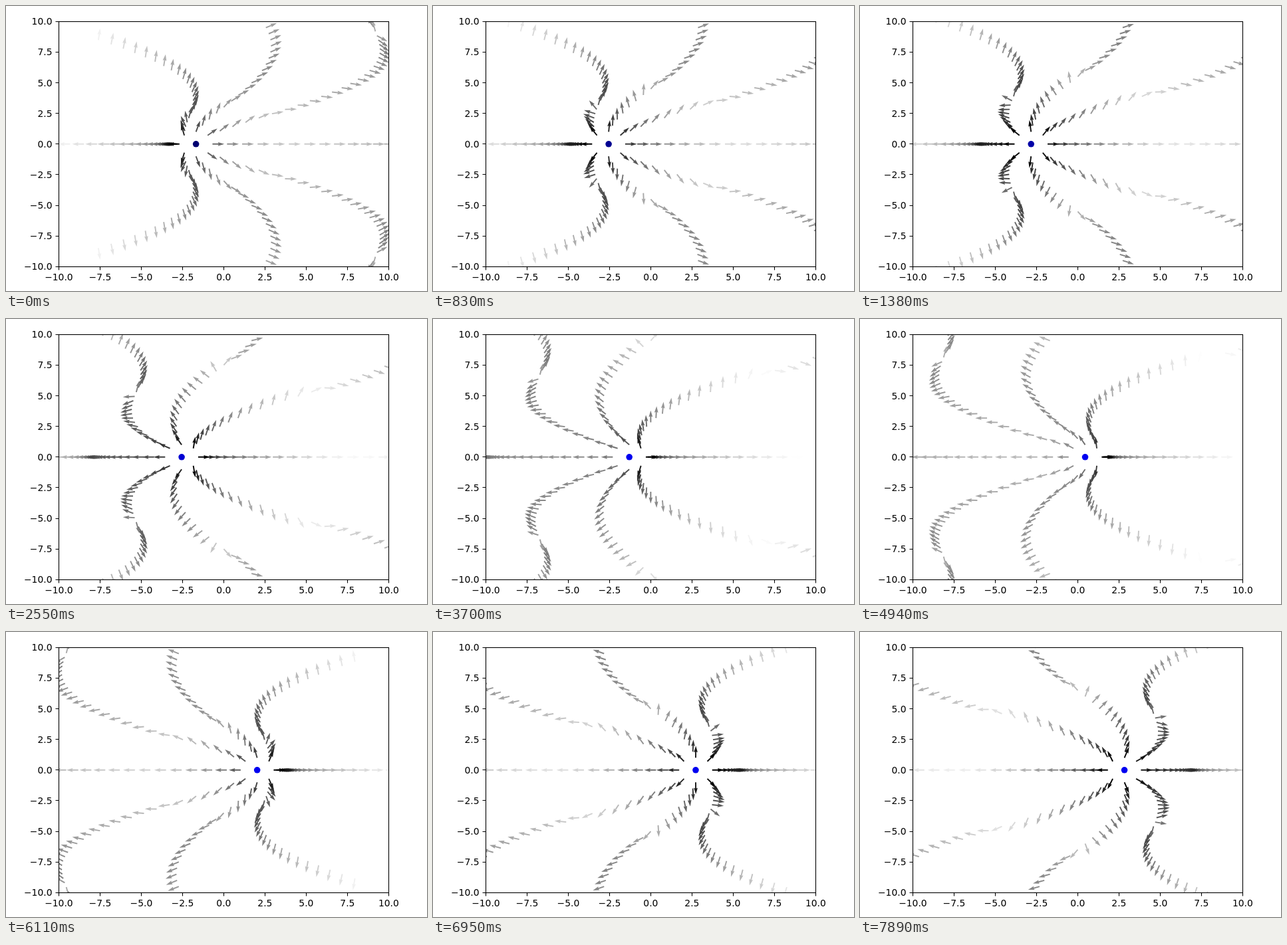
An HTML page with a canvas that plays this animation: 633 by 429 pixels, repeating every 8000 ms.

```html
<!DOCTYPE html>
<html>
<head>
<meta charset="utf-8">
<style>
html, body { margin: 0; width: 100%; height: 100%; overflow: hidden; background: #fff; }
canvas { display: block; width: 633px; height: 429px; }
</style>
</head>
<body>
<canvas id="stage" width="633" height="429"></canvas>
<script>
const ctx = document.getElementById('stage').getContext('2d');
const LOOP = 8000;
const CHANGES = [210, 520, 830, 1060, 1380, 1680, 2000, 2230, 2550, 2860, 3170, 3470, 3700, 4020,
  4330, 4640, 4940, 5250, 5570, 5800, 6110, 6410, 6720, 6950, 7270, 7590, 7890];

const box = { left: 79.4, right: 575.4, top: 23.3, bottom: 392.3 };
const px = x => box.left + (x + 10) / 20 * (box.right - box.left);
const py = y => box.bottom - (y + 10) / 20 * (box.bottom - box.top);

// Oscillating charge, speed of light = 1
const OMEGA = Math.PI / 10, PEAK_SPEED = 0.9, AMPLITUDE = PEAK_SPEED / OMEGA;
const DT = 0.5, RAYS = 8, POINTS = 30;
const FAINTEST = 0.0007;
const ARROW = 17.8, WIDTH = 1.92;

const chargeX = t => AMPLITUDE * Math.sin(OMEGA * t);

// Field of a signal emitted at time t along (nx, ny), after travelling distance r
function field(t, nx, ny, r) {
  const beta = PEAK_SPEED * Math.cos(OMEGA * t);
  const accel = -PEAK_SPEED * OMEGA * Math.sin(OMEGA * t);
  const kappa = 1 - nx * beta, k3 = kappa ** 3;
  const near = (1 - beta * beta) / (k3 * r * r);
  const far = 1 / (k3 * r);
  const along = nx * accel;
  return {
    u: near * (nx - beta) + far * (along * (nx - beta) - kappa * accel),
    v: near * ny + far * along * ny
  };
}

function fieldArrows(t) {
  const arrows = [];
  for (let i = POINTS - 1; i >= 0; i--) {
    const age = i * DT, r = 1 + age, x0 = chargeX(t - age);
    for (let j = 0; j < RAYS; j++) {
      const angle = j * 2 * Math.PI / RAYS;
      const nx = Math.cos(angle), ny = Math.sin(angle);
      const { u, v } = field(t - age, nx, ny, r);
      arrows.push({ x: x0 + r * nx, y: r * ny, angle: Math.atan2(-v, u), size: Math.hypot(u, v) });
    }
  }
  return arrows;
}

function drawArrow(x, y, angle, gray) {
  const h = WIDTH / 2, neck = ARROW - 4.5 * WIDTH, barb = ARROW - 5 * WIDTH;
  ctx.save();
  ctx.translate(x, y);
  ctx.rotate(angle);
  ctx.beginPath();
  ctx.moveTo(0, -h);
  ctx.lineTo(neck, -h);
  ctx.lineTo(barb, -3 * h);
  ctx.lineTo(ARROW, 0);
  ctx.lineTo(barb, 3 * h);
  ctx.lineTo(neck, h);
  ctx.lineTo(0, h);
  ctx.closePath();
  ctx.fillStyle = `rgb(${gray},${gray},${gray})`;
  ctx.fill();
  ctx.restore();
}

function drawAxes() {
  ctx.strokeStyle = ctx.fillStyle = '#000';
  ctx.lineWidth = 1.1;
  ctx.strokeRect(79.5, 23.5, 496, 369);
  ctx.font = '13.89px "DejaVu Sans", sans-serif';
  ctx.textBaseline = 'alphabetic';
  ctx.beginPath();
  for (let v = -10; v <= 10; v += 2.5) {
    const x = Math.floor(px(v)) + 0.5, y = Math.floor(py(v)) + 0.5;
    const label = v.toFixed(1).replace('-', '\u2212');
    ctx.moveTo(x, 392.5);
    ctx.lineTo(x, 397.5);
    ctx.moveTo(79.5, y);
    ctx.lineTo(74.5, y);
    ctx.textAlign = 'center';
    ctx.fillText(label, px(v), 413);
    ctx.textAlign = 'right';
    ctx.fillText(label, 69.5, py(v) + 5);
  }
  ctx.stroke();
}

function drawScene(step) {
  const t = (step - 16) * DT;
  ctx.fillStyle = '#fff';
  ctx.fillRect(0, 0, 633, 429);

  ctx.save();
  ctx.beginPath();
  ctx.rect(box.left, box.top, box.right - box.left, box.bottom - box.top);
  ctx.clip();
  const arrows = fieldArrows(t);
  const strongest = Math.max(...arrows.map(a => a.size));
  const range = Math.log(strongest / FAINTEST);
  for (const a of arrows) {
    const level = Math.min(1, Math.log(strongest / a.size) / range);
    drawArrow(px(a.x), py(a.y), a.angle, Math.round(255 * level ** 0.93));
  }
  ctx.restore();

  ctx.fillStyle = `rgb(0,0,${Math.min(240, 112 + 11 * step)})`;
  ctx.beginPath();
  ctx.arc(px(chargeX(t)), py(0), 4.8, 0, 2 * Math.PI);
  ctx.fill();
  drawAxes();
}

let shown = -1;
function tick() {
  const now = performance.now() % LOOP;
  const step = CHANGES.filter(c => c <= now).length;
  if (step !== shown) drawScene(shown = step);
  requestAnimationFrame(tick);
}
tick();
</script>
</body>
</html>
```
